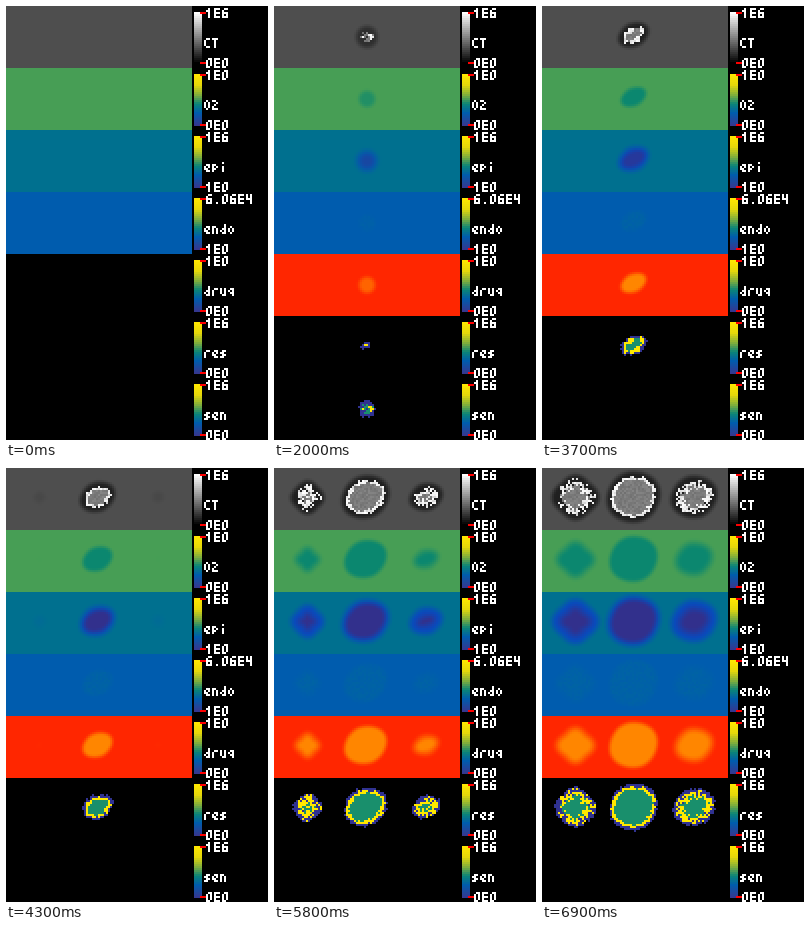
Write an HTML page with a canvas that moves like this. It is 262 px wide and 434 px high and loops after 7 s.

```html
<!DOCTYPE html>
<html lang="en">
<head>
<meta charset="utf-8">
<title>Tumour growth under treatment</title>
<style>
html, body { margin: 0; width: 262px; height: 434px; overflow: hidden; background: #000; }
canvas { display: block; }
</style>
</head>
<body>
<canvas id="stage" width="262" height="434" role="img">CT, O2, epi, endo, drug, res, sen</canvas>
<script>
const ctx = document.getElementById('stage').getContext('2d');
const LOOP = 7000, STEP = 100, CELL = 2, COLS = 93, ROWS = 31, PANEL = 62;
const DRUG_ON = 1500;

const BLUE = [48, 50, 145], TEAL = [25, 143, 108], YELLOW = [255, 232, 0];
const GREEN = [71, 158, 85], RED = [255, 38, 0];
const EPI = [[0, 112, 143], [8, 74, 190], [50, 48, 140]];
const BAR = [[0, [255, 230, 0]], [.2, [230, 216, 10]], [.4, [128, 174, 60]],
  [.58, [10, 132, 120]], [.76, [0, 92, 172]], [1, [52, 56, 144]]];

const clamp = (v, lo = 0, hi = 1) => Math.min(hi, Math.max(lo, v));
const smooth = (lo, hi, v) => { const k = clamp((v - lo) / (hi - lo)); return k * k * (3 - 2 * k); };
const mix = (a, b, k) => a.map((v, i) => v + (b[i] - v) * k);
const css = c => `rgb(${c.map(Math.round).join()})`;
const grey = v => [v, v, v];
const noise = (i, j, seed) => {
  const s = Math.sin(i * 127.1 + j * 311.7 + seed * 74.7) * 43758.5453;
  return s - Math.floor(s);
};

// Value at "at" along a list of [position, vector] keys
function ramp(keys, at) {
  const n = keys.findIndex(k => k[0] >= at);
  if (n < 0) return keys[keys.length - 1][1];
  if (n === 0) return keys[0][1];
  const [p, a] = keys[n - 1], [q, b] = keys[n];
  return mix(a, b, (at - p) / (q - p));
}

// Strokes on a 3 x 5 grid
const GLYPHS = {
  0: 'M1 0H2V3M0 1V4H1', 1: 'M1 0V4M0 1H1', 2: 'M0 0H1M2 1h.01M1 2h.01M0 3V4H2',
  4: 'M0 0V2H2M2 0V4', 6: 'M1 0H2M0 1V4H2V2H0', '.': 'M1 4h.01',
  C: 'M1 0H2M0 1V3M1 4H2', E: 'M2 0H0V4H2M0 2H2', O: 'M1 0h.01M0 1V3M2 1V3M1 4h.01',
  T: 'M0 0H2M1 0V4', d: 'M2 0V4H1M1 2H2M0 3h.01', e: 'M1 1H2V2M0 2V3H1M1 4H2',
  g: 'M1 1H2V4M0 2h.01M1 3H2', i: 'M1 0h.01M1 2V4', n: 'M0 4V1H1M2 2V4',
  o: 'M1 1h.01M0 2V3M2 2V3M1 4h.01', p: 'M0 4V1H1M2 2h.01M0 3H1', r: 'M1 1H2M0 2V4',
  s: 'M1 1H2M0 2H1M1 3H2M0 4H1', u: 'M0 1V3M1 4H2V1'
};
const paths = {};
for (const k in GLYPHS) paths[k] = new Path2D(GLYPHS[k]);

function write(text, x, y) {
  ctx.strokeStyle = '#fff';
  ctx.lineWidth = 1;
  ctx.lineCap = 'square';
  [...text].forEach((ch, n) => {
    ctx.save();
    ctx.translate(x + n * 8, y);
    ctx.scale(2, 2);
    ctx.translate(.5, .5);
    ctx.stroke(paths[ch]);
    ctx.restore();
  });
}

// Keys are [time, [long half axis, short half axis]]
const SIDE = { side: true, rough: 8, rim: 4.2, core: 9, start: 4400 };
const blobs = {
  sen: { x: 93, y: 31, tilt: 0, wave: 0, seed: 1, rough: 2.4, rim: 2.8, core: 20, start: 400,
    keys: [[300, [1, 1]], [400, [2, 2]], [1100, [7, 7]], [1400, [8.3, 8.3]], [1600, [9, 9]], [2600, [7.5, 7.5]]] },
  main: { x: 91.5, y: 29, tilt: -.48, wave: .015, seed: 2, rough: 2.6, rim: 2.3, core: 5.2, start: 1900,
    keys: [[1400, [2.2, 1]], [1900, [5, 2.6]], [3000, [11, 6]], [4300, [15.8, 12]],
           [5800, [22.2, 18.6]], [6300, [23.2, 20.6]], [6900, [24.8, 22.8]]] },
  left: { ...SIDE, x: 33.5, y: 29.5, tilt: 0, wave: .07, seed: 3,
    keys: [[4300, [.5, .5]], [5100, [8, 8]], [5800, [13.5, 13.5]], [6300, [17, 16.5]], [6900, [20, 19]]] },
  right: { ...SIDE, x: 152, y: 29, tilt: -.35, wave: .02, seed: 4,
    keys: [[4300, [.5, .5]], [5100, [8, 7]], [5800, [14.5, 11]], [6300, [18, 15]], [6900, [21, 18.5]]] }
};

// Distance inside the outline, negative outside
function depth(blob, [a, b], x, y) {
  const dx = x - blob.x, dy = y - blob.y;
  const c = Math.cos(blob.tilt), s = Math.sin(blob.tilt);
  const u = dx * c + dy * s, v = dy * c - dx * s;
  const dist = Math.hypot(u, v), rho = Math.hypot(u / a, v / b);
  if (rho < .001) return b;
  return dist / rho * (1 + blob.wave * Math.cos(4 * Math.atan2(v, u))) - dist;
}

function cellKind(blob, d, i, j) {
  const edge = d + (noise(i, j, blob.seed) - .5) * 2.2;
  if (edge < 0) return 0;
  const inner = d + (noise(i, j, blob.seed + 9) - .5) * blob.rough;
  return inner < blob.rim ? 1 : inner < blob.core ? 2 : 3;
}

// Field strengths and cell kinds at one grid place
function sample(t, live, i, j) {
  const x = i * CELL + 1, y = j * CELL + 1;
  const out = { halo: 0, field: 0, wide: 0, deep: 0, sen: 0, res: 0 };
  const raise = (key, v) => { out[key] = Math.max(out[key], v); };
  for (const { name, blob, ax, power } of live) {
    const d = depth(blob, ax, x, y), size = clamp(ax[1] / 9);
    if (d < -14) continue;
    raise('halo', power * smooth(-6, 1.5, d));
    raise('field', power * size * (blob.side ? smooth(-3, 9, d) : smooth(-3, 4, d)));
    raise('wide', power * smooth(-7, 3, d));
    raise('deep', power * clamp((ax[1] - 5) / 6) * (blob.side ? smooth(0, 13, d) : smooth(-2, 6, d)));
    if (t < blob.start) continue;
    let kind = cellKind(blob, d, i, j);
    if (name !== 'sen') raise('res', kind);
    else {
      const loss = clamp((t - 1650) / 900) * 1.5 - noise(i, j, 21) * .5;
      if (loss > .85) kind = 0;
      else if (loss > .45) kind = Math.min(kind, 1);
      else if (loss > .2 && kind === 2) kind = 3;
      out.sen = kind;
    }
  }
  // First few cells
  if (t < 400 && i === 46 && (t >= 100 && j === 15 || t >= 200 && j === 14)) out.sen = 1;
  if (t >= 1300 && t < 1900 && (i === 45 && j === 14 || i === 47 && j === 13)) out.res = 1;
  return out;
}

function liveBlobs(t) {
  return Object.entries(blobs).map(([name, blob]) => {
    let ax = ramp(blob.keys, t), power = clamp(ax[1] / 6);
    if (name === 'sen') power = t < 400 ? 0 : power * (1 - clamp((t - 1750) / 800));
    if (name === 'main' && t < 1400) power = 0;
    if (blob.side) {
      power = t < 3900 ? 0 : Math.max(power, (t - 3900) / 3200);
      if (t < 4600) ax = ax.map(v => Math.max(v, 3));
    }
    return { name, blob, ax, power };
  }).filter(o => o.power > 0);
}

function drawCell(row, i, j, color) {
  ctx.fillStyle = css(color);
  ctx.fillRect(i * CELL, row * PANEL + j * CELL, CELL, CELL);
}

const KIND = [null, BLUE, YELLOW, TEAL];

function scanColor(s, i, j) {
  const n = noise(i, j, 31), kind = Math.max(s.res, s.sen);
  if (kind === 2) return grey(195 + 60 * Math.sqrt(n));
  if (kind === 3) return grey(112 + 22 * n);
  return grey(78 - 46 * s.halo);
}

function drawFields(t) {
  const base = [grey(78), GREEN, EPI[0], [0, 92, 174], t >= DRUG_ON ? RED : grey(0), grey(0), grey(0)];
  base.forEach((c, row) => {
    ctx.fillStyle = css(c);
    ctx.fillRect(0, row * PANEL, COLS * CELL, PANEL);
  });
  const live = liveBlobs(t);
  for (let j = 0; j < ROWS; j++) for (let i = 0; i < COLS; i++) {
    const s = sample(t, live, i, j);
    if (s.res) drawCell(5, i, j, KIND[s.res]);
    if (s.sen) drawCell(6, i, j, KIND[s.sen]);
    if (s.wide <= 0 && s.halo <= 0) continue;
    drawCell(0, i, j, scanColor(s, i, j));
    drawCell(1, i, j, mix(GREEN, [8, 134, 112], s.field * .95));
    drawCell(2, i, j, mix(mix(EPI[0], EPI[1], s.wide), EPI[2], s.deep));
    drawCell(3, i, j, mix(base[3], [0, 100, 162], s.field * (.4 + .5 * noise(i, j, 41))));
    if (t >= DRUG_ON) drawCell(4, i, j, mix(RED, [255, 134, 0], s.field));
  }
}

const LEGENDS = [['CT', '1E6', '0E0'], ['O2', '1E0', '0E0'], ['epi', '1E6', '1E0'],
  ['endo', '6.06E4', '1E0'], ['drug', '1E0', '0E0'], ['res', '1E6', '0E0'], ['sen', '1E6', '0E0']];

function drawLegend([label, hi, lo], row) {
  const y = row * PANEL, stops = row ? BAR : [[0, grey(255)], [1, grey(0)]];
  for (let n = 0; n < 26; n++) {
    ctx.fillStyle = css(ramp(stops, n / 25));
    ctx.fillRect(188, y + 6 + n * CELL, 8, CELL);
  }
  ctx.fillStyle = '#f00';
  ctx.fillRect(194, y + 6, 6, 2);
  ctx.fillRect(194, y + 56, 6, 2);
  write(hi, 200, y + 2);
  write(label, 198, y + 32);
  write(lo, 200, y + 52);
}

let shown = -1;
function frame(now) {
  const t = Math.floor(now % LOOP / STEP) * STEP;
  if (t !== shown) {
    shown = t;
    ctx.fillStyle = '#000';
    ctx.fillRect(0, 0, 262, 434);
    drawFields(t);
    LEGENDS.forEach(drawLegend);
  }
  requestAnimationFrame(frame);
}
frame(performance.now());
</script>
</body>
</html>
```
